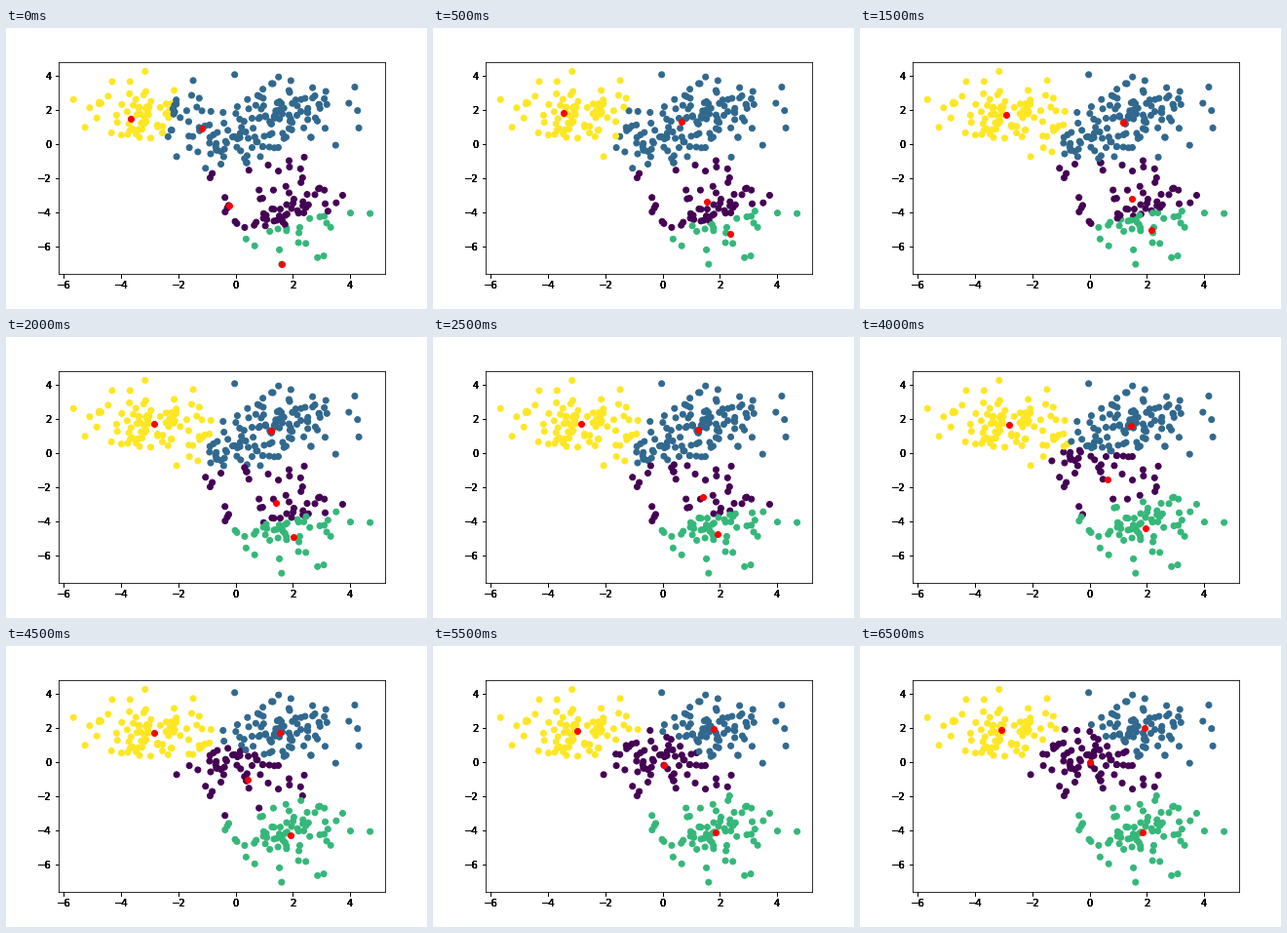
A matplotlib script for the animation above (7000 ms loop, 432 px wide and 288 px high).

```python
import numpy as np
import matplotlib.pyplot as plt
from matplotlib.animation import FuncAnimation

FRAMES, INTERVAL = 14, 500
BLOBS = [(0, 0), (2, 2), (-3, 2), (2, -4)]
SEEDS = np.array([(-0.235, -3.61), (-1.165, 0.90), (1.607, -7.04), (-3.665, 1.47)])

plt.rcParams.update({
    "font.family": "DejaVu Sans",
    "font.size": 10,
    "figure.subplot.bottom": 0.125,
})


def make_points(per_blob=75):
    rng = np.random.RandomState(0)
    pts = np.vstack([rng.normal(c, 1.0, (per_blob, 2)) for c in BLOBS])
    order = np.arange(len(pts))
    rng.shuffle(order)
    return pts[order]


def distances(a, b):
    return np.linalg.norm(a[:, None] - b[None], axis=2)


def kmeans_steps(pts, centers, count):
    steps = []
    for _ in range(count):
        labels = distances(pts, centers).argmin(axis=1)
        steps.append((centers, labels))
        centers = np.array([pts[labels == k].mean(axis=0) for k in range(len(centers))])
    return steps


points = make_points()
start = points[distances(SEEDS, points).argmin(axis=1)]
steps = kmeans_steps(points, start, FRAMES)
palette = plt.get_cmap("viridis")(np.linspace(0, 1, len(BLOBS)))

fig = plt.figure(figsize=(6, 4), dpi=72, facecolor="white")
ax = fig.add_subplot()
dots = ax.scatter(*points.T, c=palette[steps[0][1]])
means = ax.scatter(*start.T, c="r")

# Stacked bare axes make the ticks and labels heavier
for _ in range(5):
    fig.add_axes(ax.get_position(), frameon=False,
                 xlim=ax.get_xlim(), ylim=ax.get_ylim())


def update(i):
    centers, labels = steps[i]
    dots.set_facecolor(palette[labels])
    means.set_offsets(centers)
    return dots, means


anim = FuncAnimation(fig, update, frames=FRAMES, interval=INTERVAL,
                     repeat=True, repeat_delay=0)
plt.show()
```
